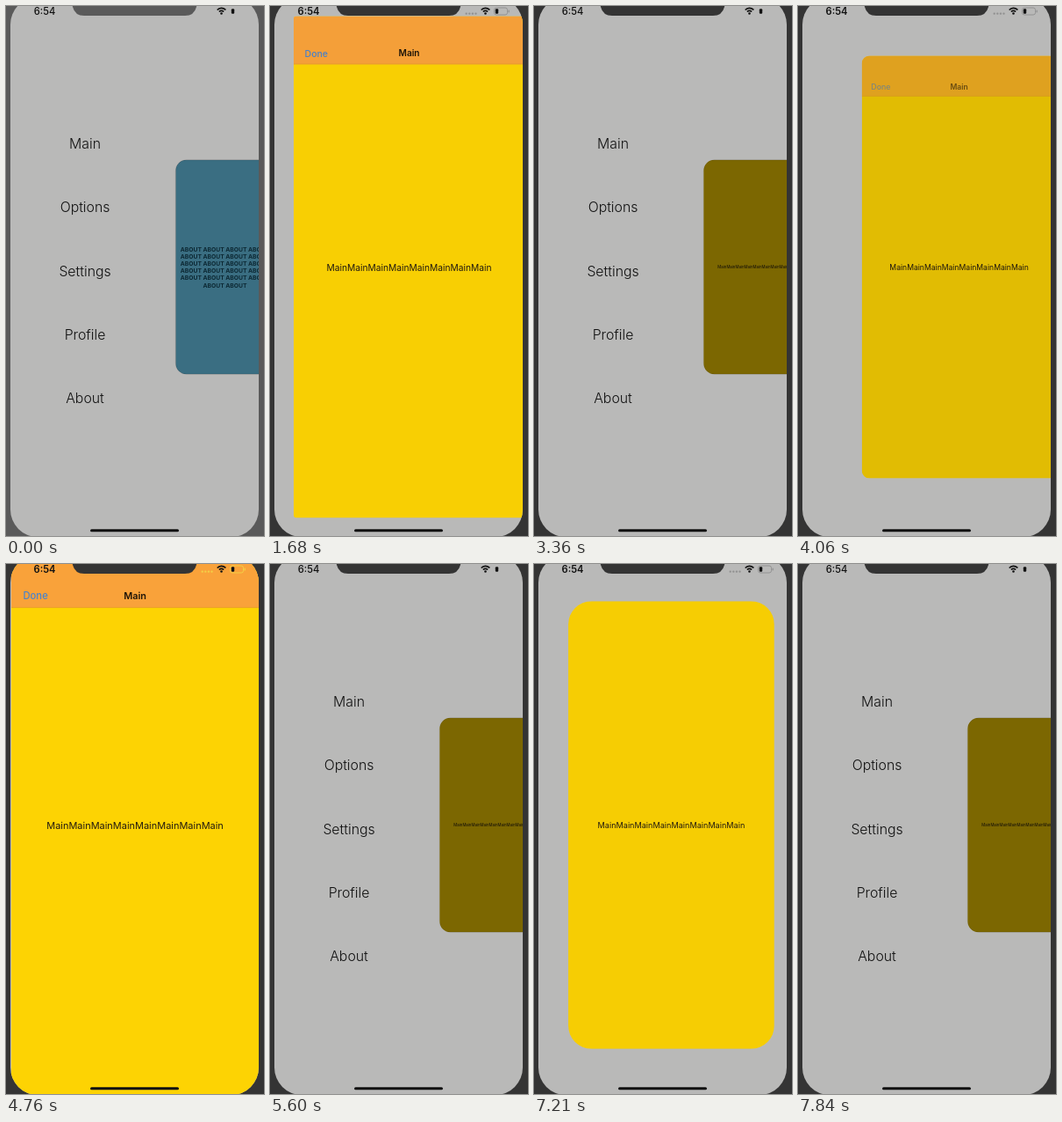
Animation of 294x602 px, one loop 8000 ms. Source, as an HTML page with a canvas:

```html
<!DOCTYPE html>
<html>
<head>
<meta charset="utf-8">
<style>
html, body { margin: 0; overflow: hidden; background: #333; }
canvas { display: block; }
</style>
</head>
<body>
<canvas id="stage" width="294" height="602"></canvas>
<script>
const ctx = document.getElementById('stage').getContext('2d');
const LOOP = 8000, CARD_W = 283, CARD_H = 613, CX = 146.5, CY = 296.5, NAV_H = 58.8;
const MENU = ['Main', 'Options', 'Settings', 'Profile', 'About'];

// start, end, closedness before and after (1 = small card beside the menu, 0 = full screen)
const MOVES = [
  [1335, 1835, 1, 0],
  [2420, 3070, 0, 1],
  [3785, 4285, 1, 0],
  [4690, 5340, 0, 1],
  [5960, 6510, 1, .455],
  [6590, 7080, .455, .28],
  [7150, 7780, .28, 1]
];
const DRAG_START = 5960;

const clamp = v => Math.max(0, Math.min(1, v));
const ease = x => x < .5 ? 4 * x ** 3 : 1 - 4 * (1 - x) ** 3;

function closedness(t) {
  let q = 1;
  for (const [start, end, from, to] of MOVES)
    if (t >= start) q = from + (to - from) * ease(clamp((t - start) / (end - start)));
  return q;
}

function text(str, x, y, size, color, weight = 400, align = 'center') {
  ctx.font = `${weight} ${size}px Inter, "Liberation Sans", sans-serif`;
  ctx.textAlign = align;
  ctx.textBaseline = 'middle';
  ctx.fillStyle = color;
  ctx.fillText(str, x, y);
}

function box(x, y, w, h, r, color) {
  ctx.beginPath();
  ctx.roundRect(x, y, w, h, r);
  if (color) {
    ctx.fillStyle = color;
    ctx.fill();
  }
}

function drawMenu(alpha) {
  ctx.globalAlpha = alpha;
  MENU.forEach((label, i) => text(label, 90, 157.5 + i * 72.2, 15.8, '#111', 300));
  ctx.globalAlpha = 1;
}

function drawNavBar(alpha) {
  ctx.globalAlpha = alpha;
  ctx.fillStyle = '#f9a23a';
  ctx.fillRect(-CARD_W / 2, -CARD_H / 2, CARD_W, NAV_H);
  ctx.fillStyle = '#e59a28';
  ctx.fillRect(-CARD_W / 2, -CARD_H / 2 + NAV_H - .7, CARD_W, .7);
  text('Done', -128, -260.5, 11.3, '#4a84cc', 500, 'left');
  text('Main', 0, -260.5, 10.9, '#1d1408', 600);
  ctx.globalAlpha = 1;
}

function drawCard(q, dragging, about) {
  const shift = dragging ? q ** 1.85 : q;
  const dim = .51 * q ** (dragging ? 2.3 : 1.5);
  const scale = 1 - .603 * q;
  const radius = dragging ? 32 : 31 * q;
  ctx.save();
  ctx.translate(CX + 103 * shift, CY);
  ctx.scale(scale, scale);
  box(-CARD_W / 2, -CARD_H / 2, CARD_W, CARD_H, radius);
  ctx.save();
  ctx.clip();
  ctx.fillStyle = about ? '#3a6e82' : '#fdd303';
  ctx.fillRect(-CARD_W / 2, -CARD_H / 2, CARD_W, CARD_H);
  if (about) {
    for (let i = 0; i < 6; i++)
      text(Array(i < 5 ? 4 : 2).fill('ABOUT').join(' '), 0, -50 + i * 20.6, 17, '#0c2833', 700);
  } else {
    text('Main'.repeat(8), 0, 1, 11, '#221a10');
    if (!dragging) drawNavBar(clamp((.6 - q) / .4));
    ctx.fillStyle = `rgba(0,0,0,${dim})`;
    ctx.fillRect(-CARD_W / 2, -CARD_H / 2, CARD_W, CARD_H);
  }
  ctx.restore();
  box(-CARD_W / 2, -CARD_H / 2, CARD_W, CARD_H, radius);
  ctx.lineWidth = 1.2;
  ctx.strokeStyle = `rgba(0,0,0,${.35 * q ** 4})`;
  ctx.stroke();
  ctx.restore();
}

function drawStatus(q) {
  text('6:54', 44, 6.5, 11.2, '#111', q > .95 ? 500 : 600);
  ctx.strokeStyle = '#111';
  ctx.lineWidth = 1.6;
  for (const r of [3.6, 6.6]) {
    ctx.beginPath();
    ctx.arc(245.5, 9, r, -Math.PI * .76, -Math.PI * .24);
    ctx.stroke();
  }
  ctx.beginPath();
  ctx.arc(245.5, 8.5, 1.3, 0, 7);
  ctx.fillStyle = '#111';
  ctx.fill();
  box(256.8, 3.3, 3.4, 5.4, 1, '#111');
  if (q > .9) return;
  const faint = q < .02 ? '#f3cf45' : '#929292';
  for (let i = 0; i < 4; i++) box(222.5 + i * 3.6, 7.6, 2.4, 2.2, 1, faint);
  box(255.5, 2, 15, 8, 2.4);
  ctx.lineWidth = 1;
  ctx.strokeStyle = faint;
  ctx.stroke();
  box(271.5, 4.5, 1.3, 3, .6, faint);
}

function drawNotch(color) {
  ctx.fillStyle = color;
  ctx.beginPath();
  ctx.moveTo(73, -2);
  ctx.quadraticCurveTo(75.5, -2, 76, 1);
  ctx.quadraticCurveTo(78.5, 11, 89, 11);
  ctx.lineTo(204, 11);
  ctx.quadraticCurveTo(214.5, 11, 217, 1);
  ctx.quadraticCurveTo(217.5, -2, 220, -2);
  ctx.fill();
}

function render(t) {
  const q = closedness(t);
  const about = t < MOVES[0][0];
  const bezel = about ? '#5a5a5a' : '#343434';
  ctx.fillStyle = bezel;
  ctx.fillRect(0, 0, 294, 602);
  ctx.save();
  box(5, -10, CARD_W, CARD_H, 31, '#b9b9b8');
  ctx.clip();
  drawMenu(clamp((q - .55) / .45));
  drawCard(q, t >= DRAG_START, about);
  drawStatus(q);
  box(96, 594.3, 101, 3, 1.5, '#111');
  ctx.restore();
  drawNotch(bezel);
}

function tick() {
  render(performance.now() % LOOP);
  requestAnimationFrame(tick);
}
tick();
</script>
</body>
</html>
```
